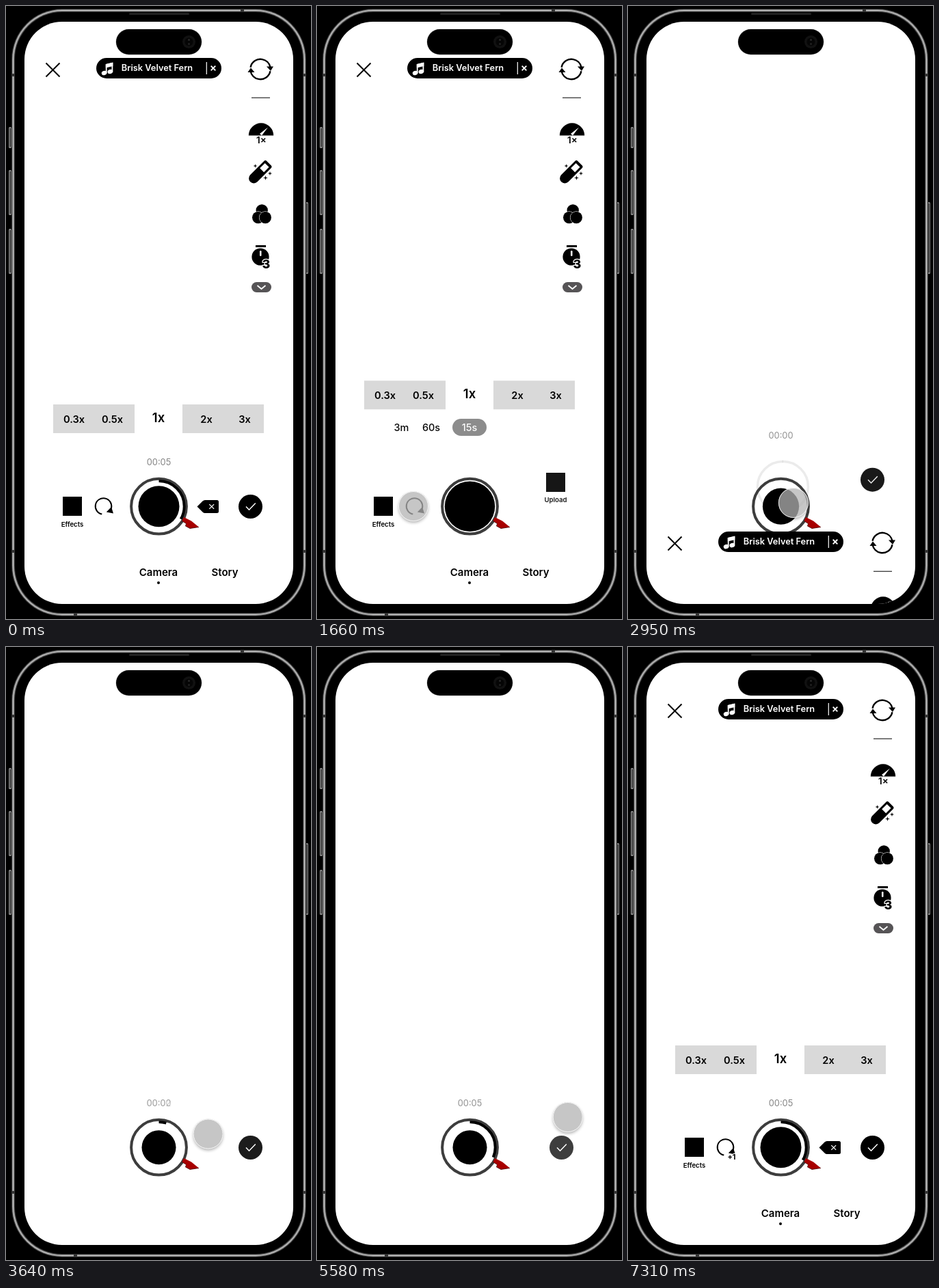
Write an HTML page with a canvas that moves like this. It is 446 by 897 pixels and loops after 8110 ms.

```html
<!DOCTYPE html>
<html lang="en">
<head>
<meta charset="utf-8">
<title>Camera screen</title>
<style>
html, body { margin: 0; width: 446px; height: 897px; overflow: hidden; background: #000; }
canvas { display: block; width: 446px; height: 897px; }
</style>
</head>
<body>
<canvas id="stage"></canvas>
<script>
const W = 446, H = 897, LOOP = 8110;
const canvas = document.getElementById('stage');
const dpr = window.devicePixelRatio || 1;
canvas.width = W * dpr;
canvas.height = H * dpr;
const c = canvas.getContext('2d');
c.scale(dpr, dpr);

const FONT = 'Inter, "Open Sans", sans-serif';
const GREY = '#3d3d3d';
const CX = 223.5, CY = 732.2;
const LIFT = -36;

const mix = (a, b, k) => a + (b - a) * k;
const span = (t, a, b) => Math.min(1, Math.max(0, (t - a) / (b - a)));
const quadOut = k => 1 - (1 - k) ** 2;
const cubicOut = k => 1 - (1 - k) ** 3;
const inOut = k => k < .5 ? 2 * k * k : 1 - 2 * (1 - k) ** 2;

function rect(x, y, w, h, r, fill) {
  c.beginPath();
  c.roundRect(x, y, w, h, r);
  c.fillStyle = fill;
  c.fill();
}
function disc(x, y, r, fill) {
  c.beginPath();
  c.arc(x, y, r, 0, 7);
  c.fillStyle = fill;
  c.fill();
}
function arc(x, y, r, a, b, width, color = '#000') {
  c.beginPath();
  c.arc(x, y, r, a, b);
  c.lineWidth = width;
  c.strokeStyle = color;
  c.stroke();
}
function trace(pts) {
  c.beginPath();
  pts.forEach(([x, y], i) => i ? c.lineTo(x, y) : c.moveTo(x, y));
}
function line(pts, width, color = '#000') {
  trace(pts);
  c.lineWidth = width;
  c.strokeStyle = color;
  c.stroke();
}
function poly(pts, fill = '#000') {
  trace(pts);
  c.closePath();
  c.fillStyle = fill;
  c.fill();
}
function cross(x, y, r, width, color) {
  line([[x - r, y - r], [x + r, y + r]], width, color);
  line([[x + r, y - r], [x - r, y + r]], width, color);
}
function text(s, x, y, size, weight = 600, fill = '#000', halo = 0) {
  c.font = `${weight} ${size}px ${FONT}`;
  c.textAlign = 'center';
  c.textBaseline = 'alphabetic';
  if (halo) {
    c.lineWidth = halo;
    c.strokeStyle = '#fff';
    c.lineJoin = 'round';
    c.strokeText(s, x, y);
    c.lineJoin = 'miter';
  }
  c.fillStyle = fill;
  c.fillText(s, x, y);
}
function layer(alpha, dx, dy, draw) {
  if (alpha <= 0) return;
  c.save();
  c.globalAlpha *= alpha;
  c.translate(dx, dy);
  draw();
  c.restore();
}

function frame() {
  c.fillStyle = '#000';
  c.fillRect(0, 0, W, H);
  const keys = [[4, 177, 31], [4, 240, 66], [4, 326, 66], [438, 287, 105]];
  for (const [x, y, h] of keys) {
    rect(x, y, 4, h, 1.5, '#858585');
    rect(x + 1.5, y + 2, 1.5, h - 4, 0, '#2c2c2c');
  }
  // metal rim, dark to bright to dark
  ['#2e2e2e', '#8c8c8c', '#c2c2c2', '#8a8a8a', '#363636', '#000'].forEach((col, i) =>
    rect(8 + i, 4 + i, 431 - 2 * i, 889 - 2 * i, 74 - i, col));
  rect(180, 10, 88, 3, 1.5, '#222');
  for (const y of [99, 796]) {
    rect(8, y, 5, 4, 0, '#333');
    rect(434, y, 5, 4, 0, '#333');
  }
  rect(343, 4, 5, 5, 0, '#333');
  rect(99, 888, 5, 5, 0, '#333');
  rect(27, 23, 393, 852, 55, '#fff');
}

function island() {
  rect(160.5, 33.5, 126, 38, 19, '#c8c8c8');
  rect(161, 34, 125, 37, 18.5, '#000');
  disc(267.5, 52.5, 9.5, '#111');
  disc(267.5, 52.5, 6, '#050505');
  disc(267.5, 49.5, 1.5, '#292929');
  disc(267.5, 55.5, 1.5, '#222');
}

function spark(x, y, r) {
  const pts = [];
  for (let i = 0; i < 8; i++) {
    const a = i * Math.PI / 4, d = i % 2 ? r * .3 : r;
    pts.push([x + d * Math.cos(a), y + d * Math.sin(a)]);
  }
  poly(pts);
}

function song() {
  rect(132, 76, 183, 30, 15, '#000');
  c.fillStyle = '#fff';
  for (const [x, y] of [[143.6, 98], [152.4, 96]]) {
    c.beginPath();
    c.ellipse(x, y, 3.9, 3.2, -.3, 0, 7);
    c.fill();
  }
  line([[146.7, 98], [146.7, 86], [155.4, 84], [155.4, 96]], 1.8, '#fff');
  poly([[145.8, 85], [156.3, 82.5], [156.3, 88], [145.8, 90.4]], '#fff');
  text('Brisk Velvet Fern', 221, 95.3, 12.8, 600, '#fff');
  rect(292.7, 82, 1.2, 18, 0, '#fff');
  cross(303, 91, 3.3, 1.9, '#fff');
}

function sideTools() {
  // flip camera
  arc(372, 92.5, 14.7, Math.PI * 1.06, Math.PI * 1.93, 2.4);
  arc(372, 92.5, 14.7, Math.PI * .06, Math.PI * .93, 2.4);
  poly([[381, 88.5], [391, 88.5], [387, 95]]);
  poly([[353.5, 97], [363.5, 97], [358, 90.5]]);
  rect(359, 133.7, 27, 1.1, 0, '#000');

  // speed
  c.beginPath();
  c.arc(373, 189.5, 18.2, Math.PI, 0);
  c.closePath();
  c.fillStyle = '#000';
  c.fill();
  poly([[371, 187], [383, 177.5], [374, 189.5]], '#fff');
  text('1×', 373.5, 201, 13.5, 600, '#000', 2);

  // wand
  c.save();
  c.translate(371, 243.5);
  c.rotate(Math.PI / 4);
  rect(-7.3, -19, 14.6, 38.5, [2.5, 2.5, 7.3, 7.3], '#000');
  rect(-4.2, -15, 8.4, 10.5, 0, '#fff');
  c.restore();
  spark(364.5, 234, 3);
  spark(379.5, 251.5, 3.4);
  spark(386, 245, 3.2);

  // filters
  for (const [x, y] of [[374.2, 299], [368.7, 309.5], [379.2, 309.5]]) {
    disc(x, y, 9.2, '#fff');
    disc(x, y, 8.7, '#000');
  }

  // timer
  rect(365, 350, 15, 3, 0, '#000');
  disc(372, 367, 12.6, '#000');
  rect(371, 358, 2.5, 8, 1.2, '#fff');
  text('3', 380.3, 383.5, 18, 800, '#000', 2.5);

  rect(359, 404, 29, 15, 7.5, '#565456');
  line([[367.5, 409], [373.5, 414], [379.5, 409]], 1.8, '#fff');
}

function zoomBar() {
  rect(69, 583, 119, 42, 0, '#d9d9d9');
  rect(258, 583, 119, 42, 0, '#d9d9d9');
  const marks = [['0.3x', 99.5], ['0.5x', 155.5], ['2x', 293], ['3x', 349]];
  for (const [s, x] of marks) text(s, x, 610, 14.6);
  text('1x', 223, 608.5, 18.5, 600);
}

function lowerTools(plusOne) {
  rect(83, 718, 28, 28, 0, '#000');
  text('Effects', 97, 762, 9.6);
  arc(142.5, 732, 11.8, Math.PI * .56, Math.PI * 2.1, 2);
  poly([[154, 733], [157, 742.5], [146.8, 740.5]]);
  if (plusOne) text('+1', 151.5, 750, 11, 700, '#000', 2.5);
  text('Camera', 223, 834, 15);
  text('Story', 320, 834, 15);
  disc(223, 844, 2, '#000');
}

function durations() {
  text('3m', 123.5, 621, 14.4, 500);
  text('60s', 167, 621, 14.4, 500);
  rect(198, 603, 50, 25, 12.5, '#888');
  text('15s', 223, 621, 14.4, 500, '#fff');
}

function upload() {
  rect(335, 683, 28, 28, 0, '#000');
  text('Upload', 349, 726, 9.6);
}

function backspace() {
  c.beginPath();
  c.moveTo(279.5, 732.5);
  c.lineTo(287.5, 724.5);
  c.quadraticCurveTo(289, 723, 291, 723);
  c.arcTo(311, 723, 311, 726, 2.5);
  c.arcTo(311, 742, 308, 742, 2.5);
  c.lineTo(291, 742);
  c.quadraticCurveTo(289, 742, 287.5, 740.5);
  c.closePath();
  c.fillStyle = '#000';
  c.fill();
  cross(300.7, 732.5, 3.4, 1.3, '#fff');
}

function confirm(shade) {
  const v = Math.round(61 * shade);
  disc(357.5, 732.5, 17.5, `rgb(${v},${v},${v})`);
  line([[351, 732.5], [355.5, 737.2], [364.8, 727.5]], 1.5, '#fff');
}

const clock = s => text('00:0' + s, 223.5, 672.3, 12.8, 400, '#858585');

function progress(deg) {
  arc(CX, CY, 37.2, -Math.PI / 2, -Math.PI / 2 + deg * Math.PI / 180, 4);
}

function shutter(r) {
  arc(CX, CY, 40.4, 0, 7, 4, GREY);
  disc(CX, CY, r, '#000');
}

function marker() {
  poly([[260, 748], [271, 753.5], [282, 762.5], [269, 764.5], [262.5, 761], [263.5, 757.5], [257.5, 753.5]], '#a80000');
  line([[257.5, 753.5], [263.5, 757.5], [262.5, 761], [269, 764.5], [282, 762.5]], .8, '#400');
}

function topTools() {
  song();
  cross(68.5, 93.5, 10, 2);
  sideTools();
}

function cursorAt(t) {
  const moves = [
    [330, 1130, 141, 732, cubicOut],
    [2060, 2260, 248, 727, cubicOut],
    [2460, 3230, 241, 727, quadOut],
    [3300, 4050, 373, 692, inOut],
    [4120, 4890, 373, 745, inOut],
    [4960, 5720, 366.5, 686, quadOut],
    [6850, 7310, 419, 924, inOut]
  ];
  let x = 378, y = 950;
  for (const [a, b, tx, ty, ease] of moves) {
    const k = ease(span(t, a, b));
    x = mix(x, tx, k);
    y = mix(y, ty, k);
  }
  return [x, y];
}

function cursor(t) {
  if (t < 330 || t >= 7310) return;
  const [x, y] = cursorAt(t);
  // shadow only outside the translucent disc
  c.save();
  c.beginPath();
  c.rect(0, 0, W, H);
  c.arc(x, y, 22, 0, 7);
  c.clip('evenodd');
  c.shadowColor = 'rgba(0,0,0,.3)';
  c.shadowBlur = 4 * dpr;
  c.shadowOffsetY = 2.5 * dpr;
  disc(x, y, 21.6, '#aaa');
  c.restore();
  disc(x, y, 22, 'rgba(178,178,178,.74)');
  arc(x, y, 21.5, 0, 7, 1, 'rgba(255,255,255,.85)');
}

function ready(t) {
  const p = cubicOut(span(t, 1390, 1790)), fade = (1 - p) ** 2;
  shutter(mix(30, 37, p));
  layer(fade, 22 * p, -215 * p, () => progress(120));
  marker();
  topTools();
  layer(1, 0, LIFT * p, zoomBar);
  lowerTools(false);
  layer(fade, 0, -294 * p, () => { clock(5); confirm(0); });
  layer(fade, 0, 150 * p, backspace);
  layer(p, 0, 30 * (1 - p), durations);
  layer(p * .945, 0, 0, upload);
}

function leaving(t) {
  const q = quadOut(span(t, 2460, 3234)), left = 1 - q;
  layer(left * .6, 22 * left, -215 * left, () => {
    arc(CX, CY, 37, 0, 7, 3.5);
    rect(CX - .7, CY - 39, 1, 4, 0, '#000');
  });
  shutter(mix(37, 25, q));
  marker();
  layer(Math.min(1, q * 1.04), 0, -294 * left, () => { clock(0); confirm(0); });
  if (q < 1) layer(1, 0, 800 * q, () => {
    topTools();
    layer(1, 0, LIFT, zoomBar);
    lowerTools(false);
    durations();
    upload();
  });
}

function recording(t) {
  const steps = [[3300, 4050, 0, 2], [4120, 4890, 2, 4], [4960, 5720, 4, 5]];
  const [a, b, from, to] = steps.filter(s => t >= s[0]).pop();
  const k = span(t, a, b);
  layer(1 - k, 0, 0, () => clock(from));
  layer(k, 0, 0, () => clock(to));
  shutter(25);
  progress(120 * span(t, 3300, 5720));
  marker();
  confirm(span(t, 3300, 4050));
}

function done(t) {
  const k = quadOut(span(t, 5790, 6400));
  clock(5);
  shutter(mix(25, 30, k));
  progress(120);
  marker();
  confirm(1 - k);
  layer(k, 0, 0, () => {
    topTools();
    zoomBar();
    lowerTools(true);
    backspace();
  });
}

function draw(t) {
  frame();
  c.save();
  c.beginPath();
  c.roundRect(27, 23, 393, 852, 55);
  c.clip();
  const scene = t < 2460 ? ready : t < 3300 ? leaving : t < 5790 ? recording : done;
  scene(t);
  c.restore();
  island();
  cursor(t);
}

const begin = performance.now();
function tick() {
  draw((performance.now() - begin) % LOOP);
  requestAnimationFrame(tick);
}
tick();
</script>
</body>
</html>
```
